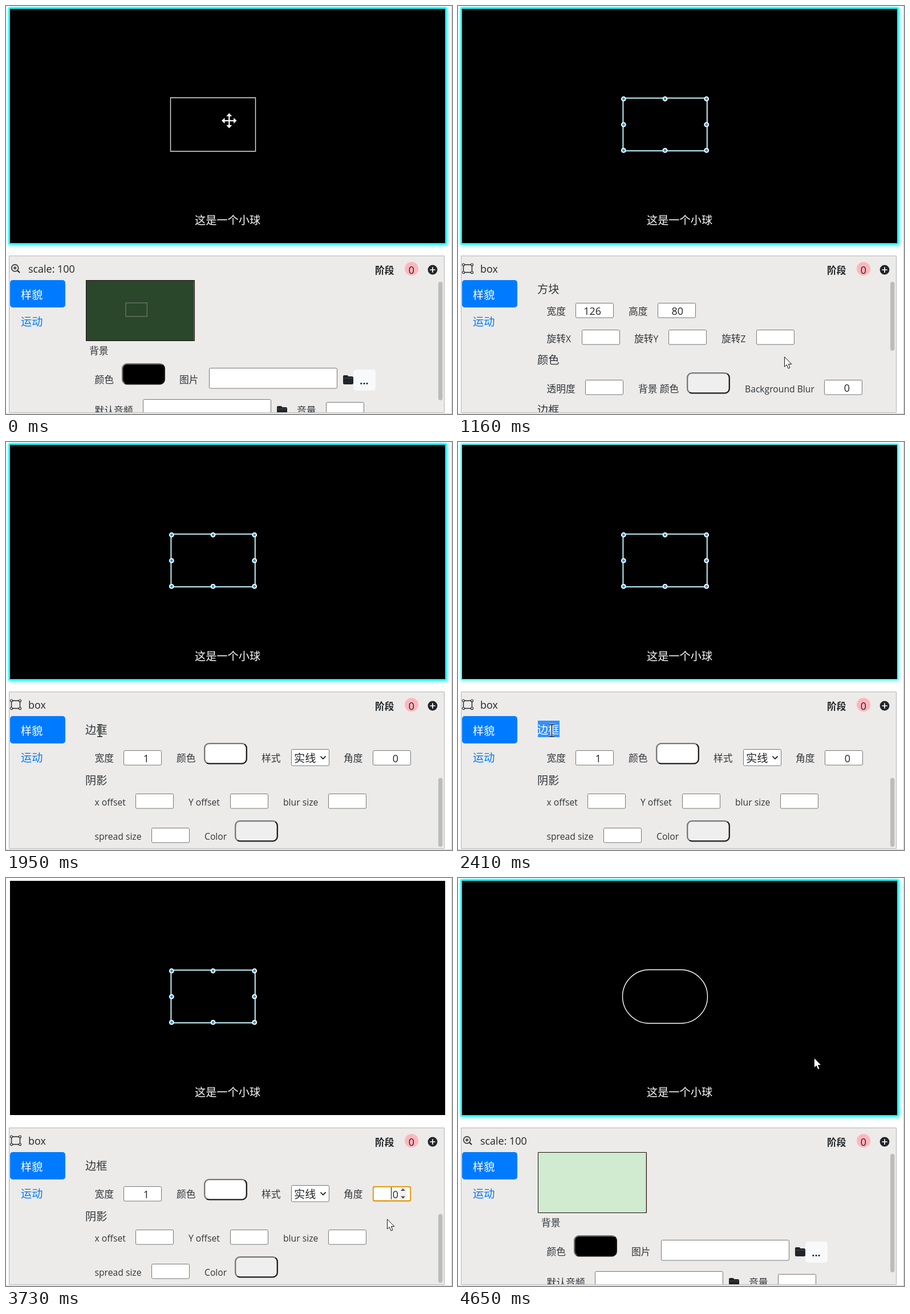
An HTML page with a canvas for the animation above (4.73 s loop, 782 by 716 pixels).

```html
<!DOCTYPE html>
<html lang="zh-CN">
<head>
<meta charset="utf-8">
<title>Box editor</title>
<style>
html, body { margin: 0; width: 100%; height: 100%; overflow: hidden; background: #fff; }
canvas { display: block; }
</style>
</head>
<body>
<canvas id="view" width="782" height="716"></canvas>
<script>
const ctx = document.getElementById('view').getContext('2d');
const LOOP = 4730;
const INK = '#212529', LABEL = '#30343a', PANEL = '#ecebe9', BLUE = '#007bff';
const BIG = 19.2, SMALL = 16.8;

// start, end, number of steps, target x, target y
const MOVES = [
  [450, 930, 7, 585, 608],
  [1010, 1160, 3, 572, 615],
  [1330, 1420, 2, 563, 626],
  [1950, 1950, 1, 164.5, 506.5],
  [2720, 3050, 5, 588, 572],
  [3100, 3190, 2, 674.5, 554.5],
  [3730, 3730, 1, 668, 598],
  [3810, 3810, 1, 663, 609],
  [4650, 4650, 1, 624, 315]
];

// share of a stepped change done at time t
function stepped(t, start, end, n) {
  if (t < start) return 0;
  if (t >= end) return 1;
  return (Math.floor((t - start) / (end - start) * (n - 1) + 1e-6) + 1) / n;
}

function cursorPos(t) {
  let x = 391.3, y = 201.3;
  for (const [start, end, n, tx, ty] of MOVES) {
    const p = stepped(t, start, end, n);
    x += (tx - x) * p;
    y += (ty - y) * p;
  }
  return [x, y];
}

function text(str, x, y, size, color = LABEL, weight = 400, align = 'left') {
  const runs = str.match(/[\u4e00-\u9fff]+|[^\u4e00-\u9fff]+/g).map(s => {
    const han = s >= '\u4e00';
    const font = han
      ? `${weight} ${size}px "Noto Sans CJK SC", "Noto Sans CJK JP", "Noto Sans CJK", sans-serif`
      : `${weight} ${size * 0.935}px "Open Sans", "Noto Sans", sans-serif`;
    ctx.font = font;
    return { s, font, w: ctx.measureText(s).width };
  });
  const total = runs.reduce((sum, r) => sum + r.w, 0);
  if (align === 'right') x -= total;
  if (align === 'center') x -= total / 2;
  ctx.fillStyle = color;
  for (const r of runs) {
    ctx.font = r.font;
    ctx.fillText(r.s, x, y);
    x += r.w;
  }
}

function box(x, y, w, h, r, fill, stroke, lw = 1) {
  ctx.beginPath();
  ctx.roundRect(x, y, w, h, r);
  if (fill) { ctx.fillStyle = fill; ctx.fill(); }
  if (stroke) { ctx.strokeStyle = stroke; ctx.lineWidth = lw; ctx.stroke(); }
}

function disc(x, y, r, fill) {
  ctx.beginPath();
  ctx.arc(x, y, r, 0, Math.PI * 2);
  ctx.fillStyle = fill;
  ctx.fill();
}

function shape(points, fill, stroke, lw = 1) {
  ctx.beginPath();
  points.forEach(([x, y]) => ctx.lineTo(x, y));
  ctx.closePath();
  if (fill) { ctx.fillStyle = fill; ctx.fill(); }
  if (stroke) { ctx.strokeStyle = stroke; ctx.lineWidth = lw; ctx.stroke(); }
}

function lines(color, lw, ...segs) {
  ctx.beginPath();
  for (const [x1, y1, x2, y2] of segs) {
    ctx.moveTo(x1, y1);
    ctx.lineTo(x2, y2);
  }
  ctx.strokeStyle = color;
  ctx.lineWidth = lw;
  ctx.stroke();
}

function input(x, y, value = '', w = 67, h = 26) {
  box(x + 0.5, y + 0.5, w - 1, h - 0.5, 2, '#fff', '#767676');
  if (value) text(value, x + w - 22, y + 20.5, BIG, INK, 400, 'right');
}

function swatch(x, y, fill, light = '#767676', dark = '#1c1c1c') {
  const w = 76, h = 37.5, cx = x + w / 2, cy = y + h / 2, k = 0.5;
  const g = ctx.createLinearGradient(cx - h * k, cy - w * k, cx + h * k, cy + w * k);
  g.addColorStop(0.5, light);
  g.addColorStop(0.5, dark);
  box(x + 1.2, y + 1.2, w - 2.4, h - 2.4, 8, fill, g, 2.3);
}

function folder(x, y) {
  box(x, y, 9, 8, 2, INK);
  box(x, y + 2, 18, 14, 2.5, INK);
  lines('#55595d', 0.8, [x + 1, y + 5, x + 17, y + 5]);
}

function stage(t, selected, round) {
  const glow = t >= 4650 ? 1 : 1 - stepped(t, 2260, 2490, 4);
  ctx.save();
  if (glow > 0) {
    ctx.globalAlpha = glow;
    ctx.shadowColor = '#0ff';
    ctx.shadowBlur = 6;
    ctx.fillStyle = '#0ff';
    ctx.fillRect(4.5, 2.5, 768, 416);
  }
  ctx.restore();
  ctx.fillStyle = '#000';
  ctx.fillRect(7, 5, 763, 411);
  text('这是一个小球', 331, 383, BIG, '#fff');

  if (!selected || round)
    box(288.5, 161, 149, 94, round ? 47 : 0, null, round ? '#fff' : '#e4e4e4', 1.4);
  if (!selected) return;
  box(289.4, 161.6, 147.4, 92.6, 0, null, '#b0e0e6', 2.2);
  for (const x of [290.3, 363, 435.7])
    for (const y of [163, 208.2, 253.4]) {
      if (x === 363 && y === 208.2) continue;
      disc(x, y, 4.4, '#fff');
      disc(x, y, 2.4, '#2196dc');
    }
}

function header(selected) {
  if (selected) {
    box(9.5, 454, 15, 13.5, 0, null, INK, 1.4);
    for (const x of [9.5, 24.5])
      for (const y of [454, 467.5]) box(x - 2, y - 2, 4, 4, 2, PANEL, INK, 1.2);
    text('box', 39, 468, BIG, INK);
  } else {
    box(9.7, 453.7, 12, 12, 6, null, INK, 1.5);
    lines(INK, 1.4, [12.7, 459.7, 18.7, 459.7], [15.7, 456.7, 15.7, 462.7]);
    lines(INK, 2.2, [20, 464, 24, 468]);
    text('scale: 100', 39, 468, BIG, INK);
  }
  text('阶段', 647, 470, SMALL, INK, 700);
  disc(711, 461, 12, '#ffb6bd');
  text('0', 711, 470, BIG, INK, 400, 'center');
  disc(748, 463, 8.4, INK);
  lines('#fff', 1.7, [743.3, 463, 752.7, 463], [748, 458.3, 748, 467.7]);

  box(7, 481, 97, 48, 4.8, BLUE);
  text('样貌', 26, 513.5, BIG, '#fff');
  text('运动', 26, 561, BIG, BLUE);
}

function sceneForm(blank) {
  box(140.5, 481.5, 190, 106, 0, blank ? '#d0ebcf' : '#2a462b', '#1a0c0c');
  lines('rgba(230,120,130,.6)', 1, [329.5, 483, 329.5, 587]);
  if (!blank) box(210, 521, 37.3, 23.8, 0, null, '#7b8a7b', 1);
  text('背景', 146, 611, SMALL);
  text('颜色', 155.5, 661.5, SMALL);
  swatch(203, 627, '#000', '#6a6a6a', '#1a1212');
  text('图片', 304, 661.5, SMALL);
  input(356, 635, '', 225, 36);
  folder(591, 648);
  box(609, 638, 39, 37, 5, '#f8f9fa');
  text('...', 628, 664, BIG, INK, 700, 'center');
  text('默认音频', 155.5, 715.5, SMALL);
  input(240, 690, '', 225, 36);
  folder(475, 702);
  text('音量', 510, 715.5, SMALL);
  input(561, 695);
}

function boxForm(t) {
  const marked = t >= 2260 && t < 3270;
  const focus = t >= 3270 && t < 4500;

  text('方块', 139, 504, BIG);
  text('宽度', 155.5, 541.5, SMALL);
  input(206, 521, '126');
  text('高度', 299, 541.5, SMALL);
  input(350, 521, '80');
  [['X', 155.5, 217], ['Y', 309, 369], ['Z', 462, 523]].forEach(([axis, x, ix]) => {
    text('旋转' + axis, x, 589.5, SMALL);
    input(ix, 568);
  });
  text('颜色', 139, 628, BIG);
  text('透明度', 155.5, 678, SMALL);
  input(223, 656);
  text('背景 颜色', 316, 678, SMALL);
  swatch(401, 643, '#efefef');
  text('Background Blur', 503, 678, SMALL);
  input(642, 656, '0');

  // lower part, 204px further down the form
  ctx.translate(0, 204);
  if (marked) {
    ctx.fillStyle = '#3390ff';
    ctx.fillRect(140, 489, 38, 29);
  }
  text('边框', 139, 512, BIG, marked ? '#fff' : LABEL);
  text('宽度', 155.5, 561, SMALL);
  input(206, 541, '1');
  text('颜色', 299, 561, SMALL);
  swatch(347, 528, '#fff');
  text('样式', 448, 561, SMALL);
  input(500, 539, '', 67, 29);
  text('实线', 505, 561.5, BIG, INK);
  lines(INK, 1.8, [551.5, 551.5, 556, 556.3], [555.6, 556.3, 560.5, 551.5]);
  text('角度', 592, 561, SMALL);
  input(643, 541, t >= 3960 ? '50' : '0');
  if (focus) {
    box(643.8, 541.8, 65.4, 24.6, 2.5, null, '#e59700', 1.9);
    ctx.fillStyle = '#f1f1f1';
    ctx.fillRect(690, 544, 13, 20);
    shape([[692, 549], [700, 549], [696, 544.8]], '#505050');
    shape([[692, 558.5], [700, 558.5], [696, 562.7]], '#505050');
    lines('#111', 1, [675.5, 543, 675.5, 564]);
  }
  text('阴影', 139, 601, BIG);
  [['x offset', 155.5, 227], ['Y offset', 320, 393], ['blur size', 486, 565]].forEach(([s, x, ix]) => {
    text(s, x, 638, SMALL);
    input(ix, 617);
  });
  text('spread size', 155.5, 697.5, SMALL);
  input(255, 677);
  text('Color', 348, 697.5, SMALL);
  swatch(401, 664, '#efefef');
}

function panel(t, selected) {
  box(5.5, 438.5, 763, 275, 0, PANEL, '#b4b4b4');
  header(selected);
  const scroll = stepped(t, 1670, 1800, 3);
  ctx.save();
  ctx.beginPath();
  ctx.rect(105, 481, 650, 232);
  ctx.clip();
  if (selected) {
    ctx.translate(0, -204 * scroll);
    boxForm(t);
  } else {
    sceneForm(t >= 4650);
  }
  ctx.restore();
  box(758, 484 + (selected ? 105.5 * scroll : 0), 7.4, selected ? 121 : 208, 3.7, '#bcbcbc');
}

function moveCursor() {
  for (let i = 0; i < 4; i++) {
    ctx.rotate(Math.PI / 2);
    ctx.fillStyle = '#fff';
    ctx.fillRect(-1.1, -10, 2.2, 10);
    shape([[0, -13.3], [5, -7.8], [-5, -7.8]], '#fff');
  }
}

function beamCursor() {
  const parts = [[0, -10, 0, 10], [-4.5, -10.5, 4.5, -10.5], [-4.5, 10.5, 4.5, 10.5]];
  lines('#fff', 3, ...parts);
  lines('#111', 1.6, ...parts);
}

function arrowCursor() {
  shape([[0.5, 0.8], [0.5, 18], [4.4, 14.6], [7, 21], [10, 19.8], [7.4, 13.6], [12.8, 13.4]],
    '#fff', '#111', 1);
}

function cursor(t) {
  if (t >= 1670 && t < 1950) return;
  const [x, y] = cursorPos(t);
  const beam = (t >= 1950 && t < 2720) || (t >= 3190 && t < 3730);
  ctx.save();
  ctx.translate(x, y);
  if (t < 930 && y < 256 && x < 438) moveCursor();
  else if (beam) beamCursor();
  else arrowCursor();
  ctx.restore();
}

function draw(t) {
  const selected = t >= 150 && t < 4650;
  ctx.fillStyle = '#fff';
  ctx.fillRect(0, 0, 782, 716);
  lines('#cfcfcf', 1, [781.5, 0, 781.5, 716], [0, 715.5, 782, 715.5]);
  stage(t, selected, t >= 4500);
  panel(t, selected);
  cursor(t);
}

const begin = performance.now();
function tick() {
  draw((performance.now() - begin) % LOOP);
  requestAnimationFrame(tick);
}
tick();
</script>
</body>
</html>
```
